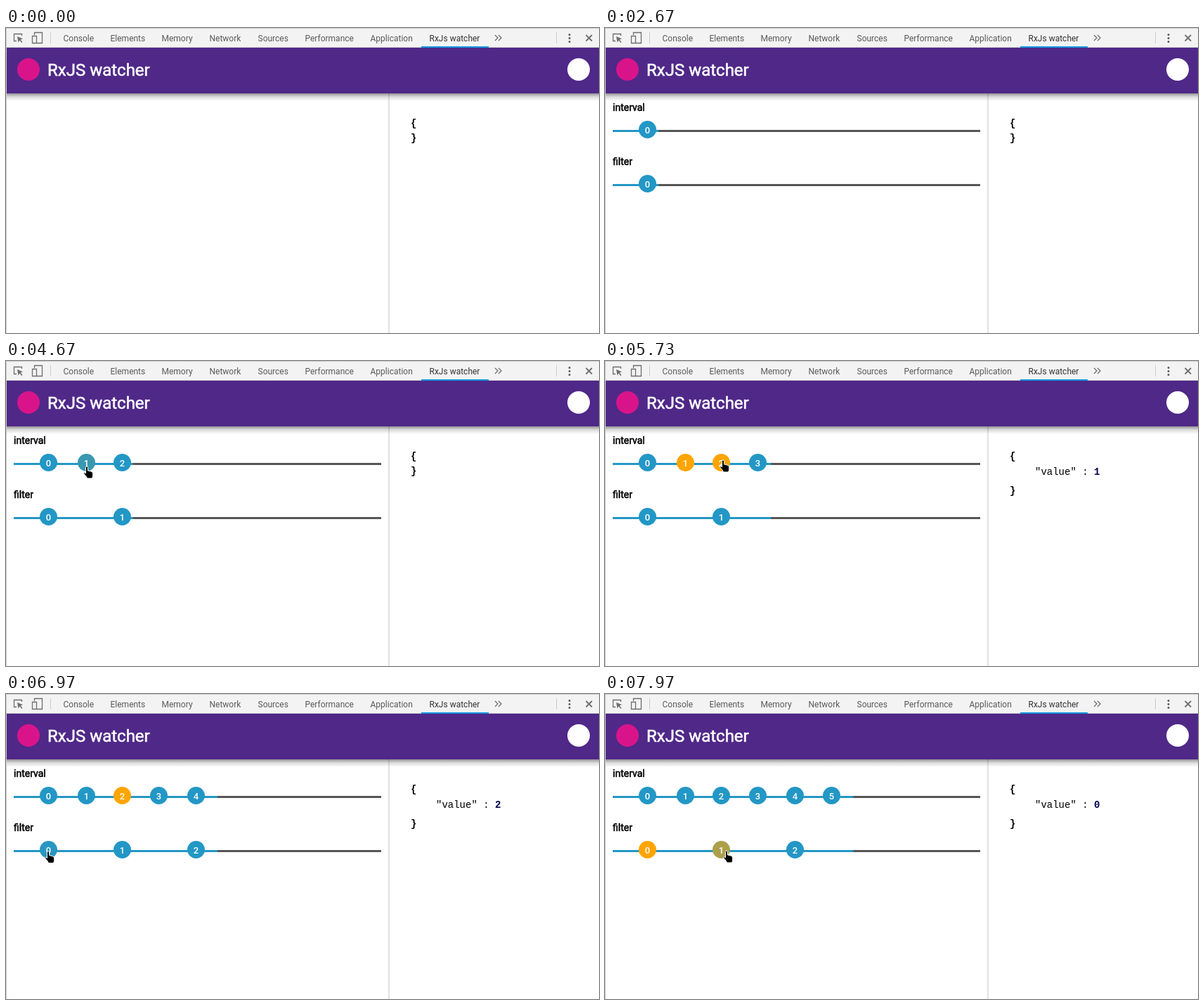
An HTML page that plays this animation: 844 by 434 pixels, repeating every 8000 ms.

```html
<!DOCTYPE html>
<html lang="en">
<head>
<meta charset="utf-8">
<title>RxJS watcher</title>
<style>
  html, body { margin: 0; width: 100%; height: 100%; overflow: hidden; background: #fff; }
  svg { display: block; width: 844px; height: 434px; font: 12px Roboto, sans-serif; }
  .tabs { fill: #5a5a5a; }
  .icon { fill: none; stroke: #6e6e6e; stroke-width: 1.3; }
  .bold { stroke-width: .55px; }
  .dot { font-size: 13px; font-weight: 500; fill: #fff; text-anchor: middle; }
  .json { font: 14px "Liberation Mono", monospace; white-space: pre; }
  .json .b { font-weight: bold; }
</style>
</head>
<body>
<svg id="stage" viewBox="0 0 844 434">
  <defs>
    <linearGradient id="shade" x2="0" y2="1">
      <stop stop-opacity=".42"/>
      <stop offset=".45" stop-opacity=".14"/>
      <stop offset="1" stop-opacity="0"/>
    </linearGradient>
  </defs>

  <path d="M545 93V434" stroke="#e2e2e2" stroke-width="2"/>
  <g class="json">
    <text class="b" x="576" y="140">{</text>
    <text id="value" x="612" y="162">"value" : <tspan id="number" class="b" fill="#00004d"></tspan></text>
    <text id="close" class="b" x="576">}</text>
  </g>
  <g id="streams"></g>

  <rect y="93" width="844" height="11" fill="url(#shade)"/>
  <rect y="28" width="844" height="65" fill="#4f2888"/>
  <circle cx="32" cy="59" r="16" fill="#d9148b"/>
  <text class="bold" x="59" y="68" font-size="24" fill="#fff" stroke="#fff">RxJS watcher</text>
  <circle cx="815" cy="59" r="16" fill="#fff"/>

  <rect width="844" height="28" fill="#f3f3f3"/>
  <path d="M0 .5H844M0 27.5H844M.5 0V434M63.5 6V22M783.5 6V22" stroke="#ccc"/>
  <g class="icon">
    <path d="M15 18.5H11.500V8.500H22.500V11"/>
    <path d="M16 12L24 15.200 20.700 16.600 23.500 20 22.300 21 19.500 17.600 17.500 20.500Z" fill="#6e6e6e" stroke="none"/>
    <path d="M40.500 10V6.500H51.500V21.500H44M37.500 11.500H43.500V21.500H37.500Z"/>
    <path d="M696 10L700 14 696 18M701 10L705 14 701 18"/>
    <path d="M825.500 10L834 18.500M834 10L825.500 18.500" stroke-width="1.8"/>
  </g>
  <path d="M802 9.500h.01M802 14.500h.01M802 19.500h.01" stroke="#5a5a5a" stroke-width="3" stroke-linecap="round"/>
  <g id="tabs" class="tabs"></g>
  <rect x="591" y="26" width="96" height="2" fill="#1a9ae0"/>

  <g id="cursor" stroke="#fff" stroke-linejoin="round">
    <path id="arrow" d="M0 0V16L3.800 12.500 6.300 18 9 16.800 6.500 11.500H11.500Z"/>
    <path id="hand" d="M-1.500 1.500a1.500 1.500 0 0 1 3 0V6L6 7q2.700.6 2.700 3V13q0 1.500-1.200 4H.5Q-.5 14-3.500 11.200q-1.500-2.200 0-2.500 1 0 2 1.300z"/>
  </g>
</svg>
<script>
const LOOP = 8000, BEGIN = 1370, START = 1425, SPEED = 0.0523;
const LEFT = 11, RIGHT = 534;
const BLUE = [35, 151, 197], ORANGE = [255, 165, 0];
const $ = id => document.getElementById(id);
const clamp = v => Math.max(0, Math.min(1, v));

function add(parent, tag, attrs, text = '') {
  const el = document.createElementNS('http://www.w3.org/2000/svg', tag);
  for (const key in attrs) el.setAttribute(key, attrs[key]);
  el.textContent = text;
  return parent.appendChild(el);
}

// CSS "ease": cubic-bezier(.25, .1, .25, 1)
function ease(p) {
  p = clamp(p);
  let lo = 0, hi = 1;
  for (let i = 0; i < 20; i++) {
    const u = (lo + hi) / 2, v = 1 - u;
    if (.75 * u * v * v + .75 * u * u * v + u * u * u < p) lo = u; else hi = u;
  }
  return .3 * lo * (1 - lo) ** 2 + 3 * lo * lo * (1 - lo) + lo ** 3;
}

[['Console', 81.5], ['Elements', 148.5], ['Memory', 221.5], ['Network', 289.5], ['Sources', 358.5],
 ['Performance', 425.5], ['Application', 518.5], ['RxJs watcher', 602.5]].forEach(([name, x], i) =>
  add($('tabs'), 'text', { x, y: 19, fill: i === 7 ? '#333' : '#5a5a5a' }, name));

const DOT_X = [60.5, 114.5, 165.5, 217.5, 270.5, 322.5];
const bars = [], dots = [];

// lit: [value, highlight start, highlight end]
function stream(name, y, ticks, lit) {
  const g = $('streams');
  add(g, 'text', { x: LEFT, y: y - 27, class: 'bold', 'font-size': 14, stroke: '#000' }, name);
  add(g, 'rect', { x: LEFT, y: y + .5, width: RIGHT - LEFT, height: 3, fill: '#555' });
  bars.push(add(g, 'rect', { x: LEFT, y: y + .5, height: 3, fill: `rgb(${BLUE})` }));
  ticks.forEach((tick, value) => {
    const el = add(g, 'g', {});
    const disc = add(el, 'circle', { r: 12.5 });
    add(el, 'text', { class: 'dot', y: 5 }, value);
    const [, on = Infinity, off = Infinity] = lit.find(l => l[0] === value) || [];
    dots.push({ el, disc, x: DOT_X[tick], y, born: 2375 + 1000 * tick, on, off });
  });
}
stream('interval', 144.5, [0, 1, 2, 3, 4, 5], [[1, 4640, 5850], [2, 5480, 7040]]);
stream('filter', 221.5, [0, 2, 4], [[0, 6960, Infinity], [1, 7862, Infinity]]);

const PATH = [[4150, -14, 330], [4400, 30, 270], [4650, 115, 150], [5350, 115, 150], [5600, 168, 141],
  [6220, 168, 141], [6470, 154, 211], [6850, 64, 234], [7020, 59, 221], [7520, 59, 221],
  [7700, 112, 229], [7960, 173, 223], [LOOP, 173, 223]];

function cursorAt(t) {
  const i = PATH.findIndex(k => k[0] > t);
  if (i < 1) return PATH[0].slice(1);
  const [t0, x0, y0] = PATH[i - 1], [t1, x1, y1] = PATH[i];
  const p = (t - t0) / (t1 - t0), s = p * p * (3 - 2 * p);
  return [x0 + (x1 - x0) * s, y0 + (y1 - y0) * s];
}

function draw(t) {
  const show = (el, on) => el.style.display = on ? '' : 'none';
  show($('streams'), t >= BEGIN);
  const width = Math.max(0, (t - START) * SPEED);
  bars.forEach(bar => bar.setAttribute('width', width));

  const [cx, cy] = cursorAt(t);
  let hover = false;
  for (const d of dots) {
    show(d.el, t >= d.born);
    d.el.setAttribute('transform', `translate(${d.x} ${d.y}) scale(${ease((t - d.born) / 200)})`);
    const heat = ease((t - d.on) / 300) - ease((t - d.off) / 300);
    d.disc.setAttribute('fill', `rgb(${BLUE.map((c, i) => Math.round(c + (ORANGE[i] - c) * heat))})`);
    hover ||= t >= d.born && Math.hypot(cx - d.x, cy - d.y) < 12.5;
  }
  show($('cursor'), t >= PATH[0][0]);
  $('cursor').setAttribute('transform', `translate(${cx} ${cy})`);
  show($('hand'), hover);
  show($('arrow'), !hover);

  const picked = t >= 4950;
  show($('value'), picked);
  $('number').textContent = t >= 7040 ? 0 : t >= 5850 ? 2 : 1;
  $('close').setAttribute('y', picked ? 189 : 161);
}

function frame() {
  draw(performance.now() % LOOP);
  requestAnimationFrame(frame);
}
frame();
</script>
</body>
</html>
```
